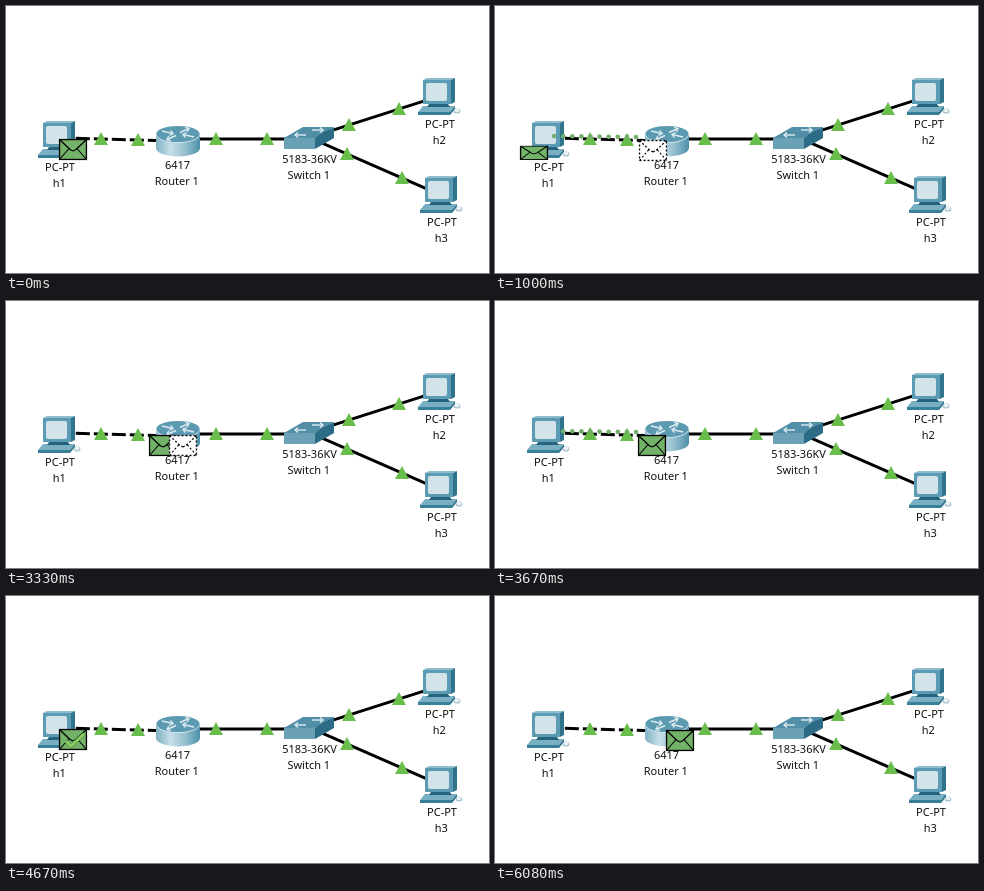
Write an HTML page with a canvas that moves like this. It is 483 by 267 pixels and loops after 8000 ms.

```html
<!DOCTYPE html>
<html lang="en">
<head>
<meta charset="utf-8">
<title>Packet simulation</title>
<style>
  html, body { margin: 0; width: 100%; height: 100%; overflow: hidden; background: #fff; }
  canvas { display: block; }
</style>
</head>
<body>
<canvas id="stage" width="483" height="267"></canvas>
<script>
const ctx = document.getElementById('stage').getContext('2d');
const LOOP = 8000, TICKS_PER_SECOND = 12;
// Starting ticks of each phase.
const REQUEST = 7, ARRIVED = 20, REPLY = 40, RESTART = 69;
const HOST_SLOT = { x: 53, y: 133 }, ROUTER_SLOT = { x: 171, y: 134 };
const WIDTH = 27, HEIGHT = 20;

// How far t has come from a to b, held between 0 and 1.
const progress = (t, a, b) => Math.min(1, Math.max(0, (t - a) / (b - a)));

function isolated(paint) {
  ctx.save();
  paint();
  ctx.restore();
}

function polygon(fill, ...points) {
  ctx.beginPath();
  points.forEach(([x, y]) => ctx.lineTo(x, y));
  ctx.fillStyle = fill;
  ctx.fill();
}

function line(color, width, ...points) {
  ctx.beginPath();
  points.forEach(([x, y]) => ctx.lineTo(x, y));
  ctx.strokeStyle = color;
  ctx.lineWidth = width;
  ctx.stroke();
}

function ellipse(x, y, rx, ry, fill) {
  ctx.beginPath();
  ctx.ellipse(x, y, rx, ry, 0, 0, Math.PI * 2);
  ctx.fillStyle = fill;
  ctx.fill();
}

// A box whose top and right side recede by (dx, -dy).
function box(x, y, w, h, dx, dy, front, top, side) {
  const right = x + w;
  polygon(top, [x, y], [x + dx, y - dy], [right + dx, y - dy], [right, y]);
  polygon(side, [right, y], [right + dx, y - dy], [right + dx, y - dy + h], [right, y + h]);
  ctx.fillStyle = front;
  ctx.fillRect(x, y, w, h);
}

function label(x, baseline, model, name) {
  ctx.fillStyle = '#111';
  ctx.font = '11px "Noto Sans", "Open Sans", sans-serif';
  ctx.textAlign = 'center';
  ctx.fillText(model, x, baseline);
  ctx.fillText(name, x - 0.7, baseline + 16);
}

function arrow(x, y, dx, dy) {
  isolated(() => {
    ctx.translate(x, y);
    ctx.rotate(Math.atan2(dy, dx));
    const reach = Math.hypot(dx, dy);
    line('#dcebf1', 1.4, [0, 0], [reach, 0]);
    line('#dcebf1', 1.4, [reach - 3, -2.5], [reach, 0], [reach - 3, 2.5]);
  });
}

function computer(x, y, name) {
  isolated(() => {
    ctx.translate(x, y);
    box(0, 34, 32, 3, 5, 6, '#387f98', '#79afc2', '#2f738d');
    box(5, 2, 28, 24, 4, 2, '#5b9cb4', '#8fbccb', '#2f738d');
    ctx.beginPath();
    ctx.roundRect(8, 5, 21, 18, 2);
    ctx.fillStyle = '#d3e3ea';
    ctx.fill();
    polygon('#26647d', [11, 26], [30, 26], [32, 29], [9, 29]);
    ellipse(39, 33, 3.4, 2.6, '#a9c4ce');
    ellipse(39, 32.5, 2.4, 1.8, '#edf4f6');
    label(22, 50, 'PC-PT', name);
  });
}

function router(x, y) {
  const rx = 22, ry = 8.5, depth = 14;
  const side = ctx.createLinearGradient(x - rx, 0, x + rx, 0);
  ['#7fb2c4', '#c6dee7', '#93bfce', '#4c8fa8'].forEach((c, i) => side.addColorStop(i / 3, c));
  ellipse(x, y + depth, rx, ry, side);
  ctx.fillRect(x - rx, y, rx * 2, depth);
  ellipse(x, y + 0.6, rx, ry, '#cfe4eb');
  ellipse(x, y, rx - 0.5, ry - 0.5, '#5b9ab1');
  for (const s of [-1, 1]) {
    arrow(x + s * 16, y + s * 3, -s * 11, -s * 2.5);
    arrow(x + s * 2, y - s * 1.5, s * 9, -s * 4);
  }
  label(x - 0.5, y + 35, '6417', 'Router 1');
}

function networkSwitch(x, y) {
  box(x, y, 31, 11, 19, 11, '#6ba1b6', '#518fa8', '#2d6c86');
  for (const s of [-1, 1]) arrow(x + 25 + s * 3, y - 5.5 - s * 2.5, s * 11, 0);
  label(x + 25.5, y + 25, '5183-36KV', 'Switch 1');
}

// A cable defined by its two status lights; it runs on under the devices.
function cable(a, b, dash = []) {
  const along = t => [a[0] + (b[0] - a[0]) * t, a[1] + (b[1] - a[1]) * t];
  ctx.setLineDash(dash);
  line('#000', 3, along(-0.68), along(1.68));
  ctx.setLineDash([]);
  return [a, b];
}

function network() {
  const lights = [
    cable([95, 133], [132, 134], [14, 4]),
    cable([210, 133], [261, 133]),
    cable([343, 119], [393, 103]),
    cable([341, 148], [396, 172])
  ].flat();
  computer(32, 115, 'h1');
  computer(412, 72, 'h2');
  computer(414, 170, 'h3');
  router(172, 128);
  networkSwitch(278, 132);
  for (const [x, y] of lights) polygon('#68bd4b', [x, y - 7], [x + 7, y + 6], [x - 7, y + 6]);
}

// shown: part uncovered from the top; stretch: height, squeezed towards the bottom.
function envelope({ x, y }, { shown = 1, stretch = 1, ghost = false, alpha = 1 } = {}) {
  if (shown * stretch * alpha <= 0) return;
  isolated(() => {
    ctx.globalAlpha = alpha;
    ctx.translate(x + 0.5, y + 0.5 + HEIGHT * (1 - stretch));
    ctx.scale(1, stretch);
    ctx.beginPath();
    ctx.rect(-1, -1, WIDTH + 2, (HEIGHT + 2) * shown);
    ctx.clip();
    ctx.fillStyle = ghost ? '#fff' : '#73b269';
    ctx.fillRect(0, 0, WIDTH, HEIGHT);
    if (ghost) ctx.setLineDash([2, 2]);
    ctx.strokeStyle = '#000';
    ctx.lineWidth = 1.4;
    ctx.strokeRect(0, 0, WIDTH, HEIGHT);
    const middle = WIDTH / 2;
    for (const s of [-1, 1]) {
      line('#000', 1.3, [middle + s * middle, 0], [middle + s * 3, 10], [middle, 11.5]);
      line('#000', 1.1, [middle + s * middle, HEIGHT], [middle + s * 4, 9]);
    }
  });
}

function checkMark({ x, y }, grown, alpha) {
  isolated(() => {
    ctx.globalAlpha = alpha;
    ctx.beginPath();
    ctx.rect(x, y, WIDTH * grown, HEIGHT);
    ctx.clip();
    const mark = [[x + 7, y + 12], [x + 12, y + 17], [x + 25, y + 5]];
    line('#4f8f40', 3.6, ...mark);
    line('#8ccf5f', 2.6, ...mark);
  });
}

// Dots appear from the sender onward and go out in the same order after a lag.
function trail(step, lag, backward) {
  const count = 11;
  for (let i = Math.max(0, step - lag); i < Math.min(count, step * 2.2); i++) {
    const place = backward ? count - 1 - i : i;
    ellipse(50 + place * 9.1, 130 + place * 0.1, 2.3, 2.3, '#72ad69');
  }
}

const shifted = (slot, dx) => ({ x: slot.x + dx, y: slot.y });

function leave(slot, step) {
  envelope(shifted(slot, -28), { stretch: 1 - progress(step, 4, 7) });
  if (step < 3) envelope(shifted(slot, -8 - step * 7), { ghost: true });
}

function request(step) {
  trail(step, 4, false);
  leave(HOST_SLOT, step);
  if (step > 3) envelope(shifted(ROUTER_SLOT, -WIDTH * (1 - progress(step, 6, 10))), { ghost: true });
  envelope(ROUTER_SLOT, { shown: progress(step, 9, 13) });
}

function reply(step) {
  if (step < 16) trail(step, 7, true);
  leave(ROUTER_SLOT, step);
  envelope(HOST_SLOT, { shown: progress(step, 5, 9) });
  checkMark(HOST_SLOT, progress(step, 11, 15), 1 - progress(step, 20, 30));
}

function draw(tick) {
  ctx.fillStyle = '#fff';
  ctx.fillRect(0, 0, 483, 267);
  network();
  if (tick < REQUEST) envelope(HOST_SLOT);
  else if (tick < ARRIVED) request(tick - REQUEST);
  else if (tick < REPLY) envelope(ROUTER_SLOT);
  else if (tick <= RESTART) reply(tick - REPLY);
  else {
    const fade = progress(tick, RESTART, RESTART + 4);
    envelope(HOST_SLOT, { alpha: 1 - fade });
    envelope(ROUTER_SLOT, { alpha: fade });
  }
}

const start = performance.now();
function frame() {
  const time = (performance.now() - start) % LOOP;
  draw(Math.floor((time + 4) * TICKS_PER_SECOND / 1000));
  requestAnimationFrame(frame);
}
frame();
</script>
</body>
</html>
```
